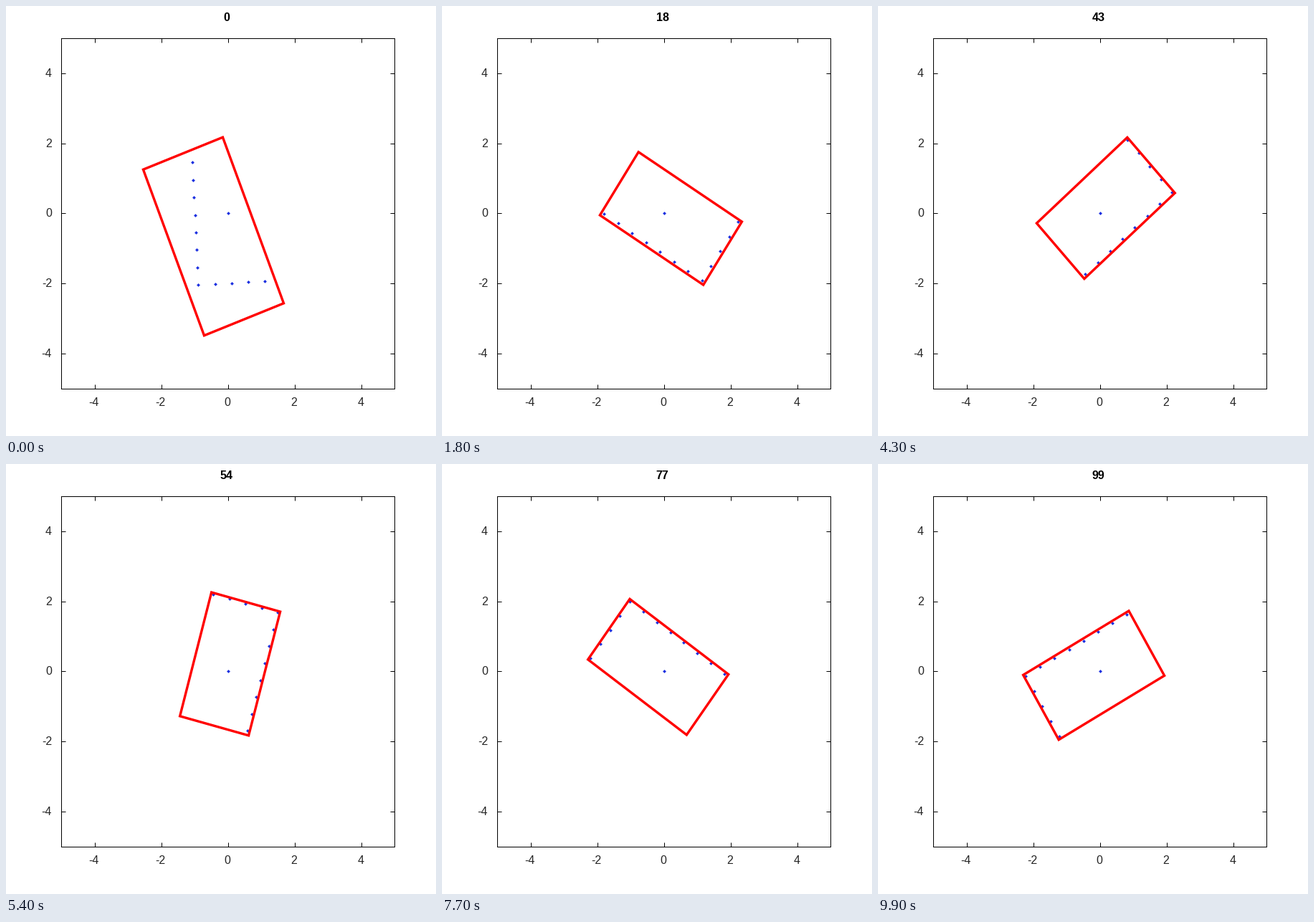
Recreate the animation shown at these times as a matplotlib script. Size 600 px wide and 600 px high, loop 10000 ms.

```python
import numpy as np
import matplotlib.pyplot as plt
from matplotlib.animation import FuncAnimation
from matplotlib.collections import PolyCollection
from matplotlib.patches import Polygon

SIZE, DPI, FRAMES = 600, 100, 100
PX = 72 / DPI  # points per pixel
LEFT, RIGHT, TOP, BOTTOM = 77.45, 542.45, 45.1, 533.85
STEP = 3  # degrees per frame
PIXEL = np.array([10 / (RIGHT - LEFT), 10 / (BOTTOM - TOP)])  # in data units

plt.rcParams["font.family"] = "Liberation Sans"
fig = plt.figure(figsize=(SIZE / DPI, SIZE / DPI), dpi=DPI, facecolor="white")
ax = fig.add_axes([LEFT / SIZE, 1 - BOTTOM / SIZE,
                   (RIGHT - LEFT) / SIZE, (BOTTOM - TOP) / SIZE])
ax.set(xlim=(-5, 5), ylim=(-5, 5))
ticks = range(-4, 5, 2)
ax.set_xticks(ticks)
ax.set_yticks(ticks)
ax.tick_params(direction="in", length=6 * PX, width=PX, top=True, right=True,
               labelbottom=False, labelleft=False)
for spine in ax.spines.values():
    spine.set_linewidth(PX)


def label(x, y, text, **style):
    return fig.text(x / SIZE, 1 - y / SIZE, text, fontsize=16 * PX,
                    va="baseline", **style)


for t in ticks:
    x = LEFT + (t + 5) / PIXEL[0]
    y = BOTTOM - (t + 5) / PIXEL[1]
    label(x - 1.3, 558, f"{t}", ha="center", color="#262626")
    label(64, y + 5, f"{t}", ha="right", color="#262626")
title = label(307.5, 21, "0", ha="center", color="black", weight="bold")

# L-shaped scan: a long side and a short side sharing one corner, plus origin
side = [(-1, y) for y in np.arange(1.5, -2.1, -0.5)]
base = [(x, -2) for x in np.arange(-0.5, 1.1, 0.5)]
scan = np.array(side + base + [(0, 0)])
corners = np.array([(-1, -1), (1, -1), (1, 1), (-1, 1)]) / 2
diamond = 2.4 * PIXEL * [(0, 1), (1, 0), (0, -1), (-1, 0)]

dots = PolyCollection([], facecolor="#1a2ee0", edgecolor="none")
ax.add_collection(dots, autolim=False)
box = Polygon(corners, closed=True, fill=False, ec="red", lw=3.4 * PX,
              joinstyle="miter", zorder=3)
ax.add_patch(box)


def rotate(pts, deg):
    a = np.radians(deg)
    c, s = np.cos(a), np.sin(a)
    return np.asarray(pts) @ np.array([(c, s), (-s, c)])


def to_grid(pts):
    """Move points to the middle of the nearest screen pixel."""
    return (np.round(pts / PIXEL) + (0.55, 0)) * PIXEL


def update(n):
    heading = STEP * (n + 1)
    miss = np.exp(-n / 4.5)  # error left in the fitted box
    size = np.array([2.135, 3.66]) + miss * np.array([0.423, 1.42])
    drift = 0.03 * min(1, n / 60)
    center = (-0.474 * miss, -0.25 + drift - 0.381 * miss)

    spots = to_grid(rotate(scan, heading))
    dots.set_verts(spots[:, None] + diamond)
    box.set_xy(rotate(corners * size, heading + 18.1 * miss)
               + rotate(center, heading))
    title.set_text(str(n))
    return dots, box, title


anim = FuncAnimation(fig, update, frames=FRAMES, interval=100,
                     repeat=True, repeat_delay=0, blit=False)
plt.show()
```
